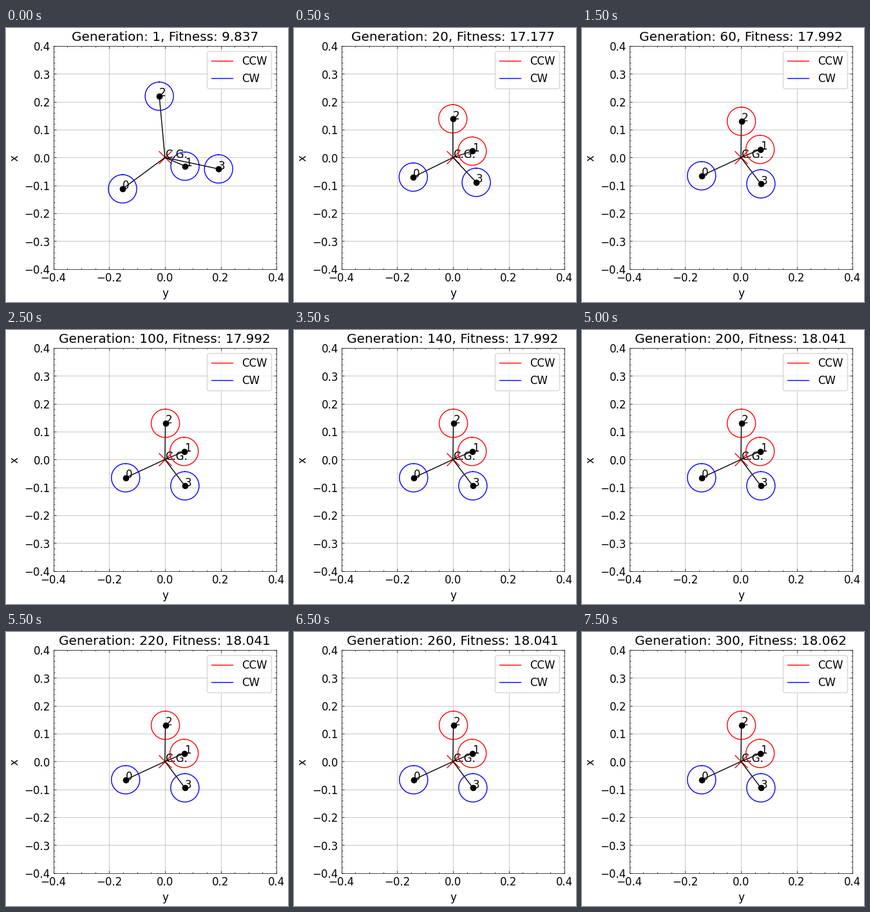
Animation of 438x426 px, one loop 8 s. Source, as a matplotlib script:

```python
import numpy as np
import matplotlib.pyplot as plt
from matplotlib.animation import FuncAnimation
from matplotlib.text import Text
from matplotlib.ticker import AutoMinorLocator, MultipleLocator
from matplotlib.transforms import Affine2D

W, H, DPI = 438, 426, 100
LEFT, BOTTOM, SIDE = 73.64, 51.4, 346.5
RADIUS = 0.0508
STEPS, SETTLED = 16, 3

style = {"font.family": "DejaVu Sans", "font.size": 12,
         "axes.linewidth": 0.5, "grid.linewidth": 0.5, "lines.linewidth": 1.0,
         "xtick.top": True, "ytick.right": True}
for axis in ("xtick", "ytick"):
    style[f"{axis}.direction"] = "in"
    for kind, size in (("major", 3), ("minor", 1.5)):
        style[f"{axis}.{kind}.size"] = size
        style[f"{axis}.{kind}.width"] = 0.5
plt.rcParams.update(style)

# Rotor centres of the first and of the best design
FIRST = np.array([(-0.152, -0.1125), (0.0718, -0.031), (-0.0203, 0.220), (0.1922, -0.041)])
BEST = np.array([(-0.1412, -0.0655), (0.0687, 0.029), (0.0015, 0.130), (0.0714, -0.0945)])
# Steps at which the best fitness improves
GAINS = {SETTLED: 17.992, 8: 18.001, 10: 18.041, 14: 18.062}


def gap(step):
    """Remaining share of the way to the best design."""
    return 0.1 ** step if step < SETTLED else 0


def fitness(step):
    best = max([v for k, v in GAINS.items() if k <= step], default=GAINS[SETTLED])
    return best - 8.155 * gap(step)


fig = plt.figure(figsize=(W / DPI, H / DPI), dpi=DPI, facecolor="white")
ax = fig.add_axes([LEFT / W, BOTTOM / H, SIDE / W, SIDE / H])
ax.set(xlim=(-0.4, 0.4), ylim=(-0.4, 0.4), xlabel="y", ylabel="x")
for axis, major, parts in ((ax.xaxis, 0.2, 4), (ax.yaxis, 0.1, 5)):
    axis.set_major_locator(MultipleLocator(major))
    axis.set_minor_locator(AutoMinorLocator(parts))
ax.grid(True)
title = ax.set_title("", x=0.4994)

ax.plot([], [], "r-", label="CCW")
ax.plot([], [], "b-", label="CW")
ax.legend(loc="upper right")

ax.plot(0, 0, "rx", markersize=14)
ax.text(0, 0, "C.G.")

arms, hubs, rings, tags = [], [], [], []
for i in range(len(BEST)):
    arms += ax.plot([], [], "k-")
    hubs += ax.plot([], [], "ko", markersize=6)
    rings += ax.plot([], [], "b-")
    tags.append(ax.text(0, 0, str(i)))

theta = np.linspace(0, 2 * np.pi, 100)
ring_x, ring_y = RADIUS * np.sin(theta), RADIUS * np.cos(theta)

# Text sits a fraction of a pixel below the line work
fig.canvas.draw()
nudge = Affine2D().translate(0, -0.4)
for text in fig.findobj(Text):
    text.set_transform(text.get_transform() + nudge)


def draw(step):
    title.set_text(f"Generation: {max(1, 20 * step)}, Fitness: {fitness(step):.3f}")
    centres = BEST + (FIRST - BEST) * gap(step)
    for i, (x, y) in enumerate(centres):
        arms[i].set_data([0, x], [0, y])
        hubs[i].set_data([x], [y])
        rings[i].set_data(x + ring_x, y + ring_y)
        rings[i].set_color("r" if step and i in (1, 2) else "b")
        tags[i].set_position((x, y))
    return [title, *arms, *hubs, *rings, *tags]


anim = FuncAnimation(fig, draw, frames=STEPS, init_func=lambda: draw(0),
                     interval=500, repeat=True, repeat_delay=0)
plt.show()
```
